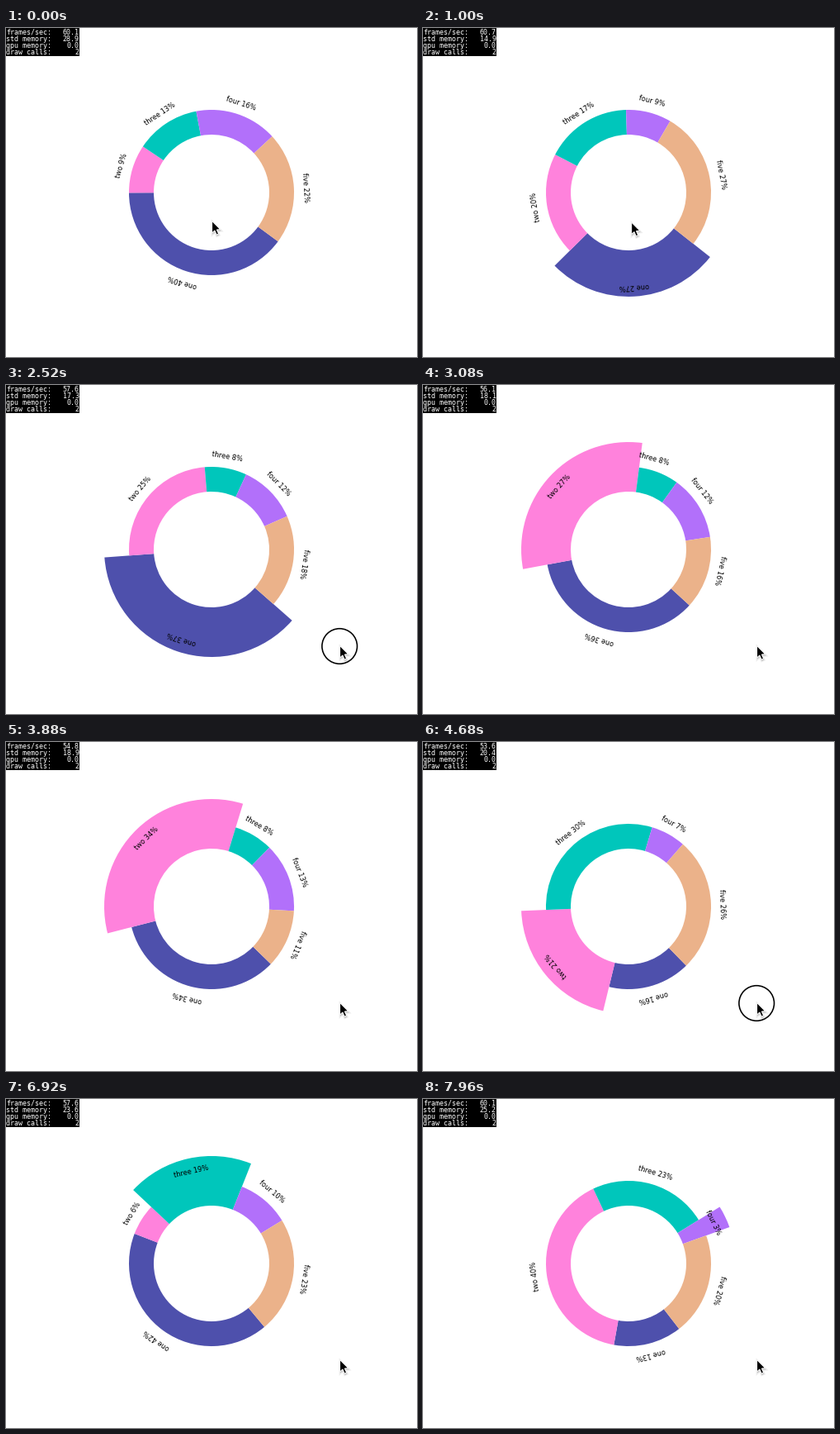
These frames come from a looping animation (498x398 px, 8 s). A matplotlib script:

```python
import math

import matplotlib.pyplot as plt
import numpy as np
from matplotlib.animation import FuncAnimation
from matplotlib.patches import Circle, Polygon, Rectangle, Wedge

W, H, DPI = 498, 398, 100
STEP, FRAMES = 0.04, 200
CENTER = np.array([249, 199])
R_IN, R_OUT, R_BIG, R_TEXT = 70, 100, 130, 113.5

NAMES = ["one", "two", "three", "four", "five"]
COLORS = ["#4e50ac", "#ff82dc", "#00c6bb", "#b270fa", "#ebb28a"]

# Key poses, one per second: degrees of the first four slices,
# the fifth takes what is left of the circle.
POSES = [
    (143.5, 34, 45.5, 58),
    (97, 72, 61, 32),
    (57.5, 62, 86, 42),
    (134.5, 89.5, 29.5, 41.5),
    (121.5, 121.5, 27.5, 48.5),
    (58, 74, 109, 24.5),
    (158.5, 37, 38, 24),
    (151, 22, 68.5, 37),
    (48, 144.5, 83.5, 12),
]
TAU = 0.07      # easing time constant, seconds
DELAY = 0.02    # lag of each new pose behind the full second
START, SPIN = 36.3, 2   # ring angle and degrees per second

# Each mouse release pulls out the next slice.
RELEASES = [0.86, 2.58, 4.74, 7.14]
HOLD = 0.14

MOVE_FROM, MOVE_TIME = 0.96, 0.48
REST_A, REST_B = np.array([249.6, 233.4]), np.array([404.6, 315.4])
ARROW = np.array([(0, 0), (0, 14.6), (3.3, 11.6), (5.5, 16.7),
                  (8, 15.6), (5.8, 10.6), (10.2, 10.3)])


def ease_out(t):
    return 1 - math.exp(-max(t, 0) / TAU)


def pose(k):
    return np.array([*POSES[k], 360 - sum(POSES[k])])


def spans(t):
    t = max(t - DELAY, 0)
    k = min(int(t), len(POSES) - 2)
    return pose(k) + (pose(k + 1) - pose(k)) * ease_out(t - k)


def edges(t):
    return START + SPIN * t + np.concatenate([[0], np.cumsum(spans(t))])


def radius(i, t):
    """Grow on the slice's own release, shrink on the following one."""
    out, back = ([ease_out(t - r) for r in RELEASES] + [0, 0])[i:i + 2]
    return R_OUT + (R_BIG - R_OUT) * out * (1 - back)


def pointer(t):
    p = np.clip((t - MOVE_FROM) / MOVE_TIME, 0, 1)
    return REST_A + (REST_B - REST_A) * p * p * (3 - 2 * p)


def readings(t):
    """Frame rate drifts in a slow wave, memory fills up and is freed."""
    tick = int((t + 0.02) / 0.5)
    fps = 57.2 + 3.6 * math.cos(math.tau * (tick - 1.5) / 15)
    memory = 14.9 + 0.79 * (tick - 2) % 15.58
    return fps, memory


def px(size):
    return size * 72 / DPI


plt.rcParams["font.family"] = "DejaVu Sans"
fig = plt.figure(figsize=(W / DPI, H / DPI), dpi=DPI, facecolor="white")
ax = fig.add_axes([0, 0, 1, 1])
ax.set_xlim(0, W)
ax.set_ylim(H, 0)
ax.axis("off")

slices = [ax.add_patch(Wedge(CENTER, R_OUT, 0, 1, width=R_OUT - R_IN,
                             facecolor=c, linewidth=0)) for c in COLORS]
labels = [ax.text(0, 0, "", fontsize=px(8.3), color="black", ha="center",
                  va="center", rotation_mode="anchor", zorder=3)
          for _ in NAMES]

ax.add_patch(Rectangle((0, 0), 89, 34, facecolor="black", linewidth=0))
stats = []
for row, title in enumerate(["frames/sec:", "std memory:",
                             "gpu memory:", "draw calls:"]):
    y = 7.5 + 8 * row
    style = dict(fontsize=px(8.4), color="white", va="baseline", zorder=3,
                 family="DejaVu Sans Mono")
    ax.text(0.5, y, title, ha="left", **style)
    stats.append(ax.text(88.5, y, "", ha="right", **style))
stats[2].set_text("0.0")
stats[3].set_text("2")

shadows = [ax.add_patch(Polygon(ARROW, facecolor="black", alpha=0.07,
                                edgecolor="black", linewidth=px(w), zorder=4))
           for w in (1, 3)]
arrow = ax.add_patch(Polygon(ARROW, facecolor="black", edgecolor="white",
                             linewidth=px(1), zorder=5))
ring = ax.add_patch(Circle((0, 0), 21.3, fill=False, edgecolor="black",
                           linewidth=px(1.6), zorder=6))


def draw(n):
    t = n * STEP

    cuts = edges(t)
    for i, wedge in enumerate(slices):
        r = radius(i, t)
        wedge.set_radius(r)
        wedge.set_width(r - R_IN)
        wedge.set_theta1(cuts[i])
        wedge.set_theta2(cuts[i + 1])

    # Captions trail the ring by one step.
    cuts, sizes = edges(t - STEP), spans(t - STEP)
    for i, label in enumerate(labels):
        mid = (cuts[i] + cuts[i + 1]) / 2
        a = math.radians(mid)
        label.set_position(CENTER + R_TEXT * np.array([math.cos(a),
                                                       math.sin(a)]))
        label.set_rotation(270 - mid)
        label.set_text(f"{NAMES[i]} {sizes[i] / 3.6:.0f}%")

    for text, value in zip(stats, readings(t)):
        text.set_text(f"{value:.1f}")

    tip = pointer(t)
    arrow.set_xy(ARROW + tip)
    for shadow in shadows:
        shadow.set_xy(ARROW + tip + (0.5, 1.5))
    ring.center = tip + (-0.4, 0.6)
    ring.set_visible(any(r - HOLD <= t < r for r in RELEASES))
    return []


anim = FuncAnimation(fig, draw, frames=FRAMES, interval=STEP * 1000,
                     repeat=True, repeat_delay=0, blit=False)
plt.show()
```
